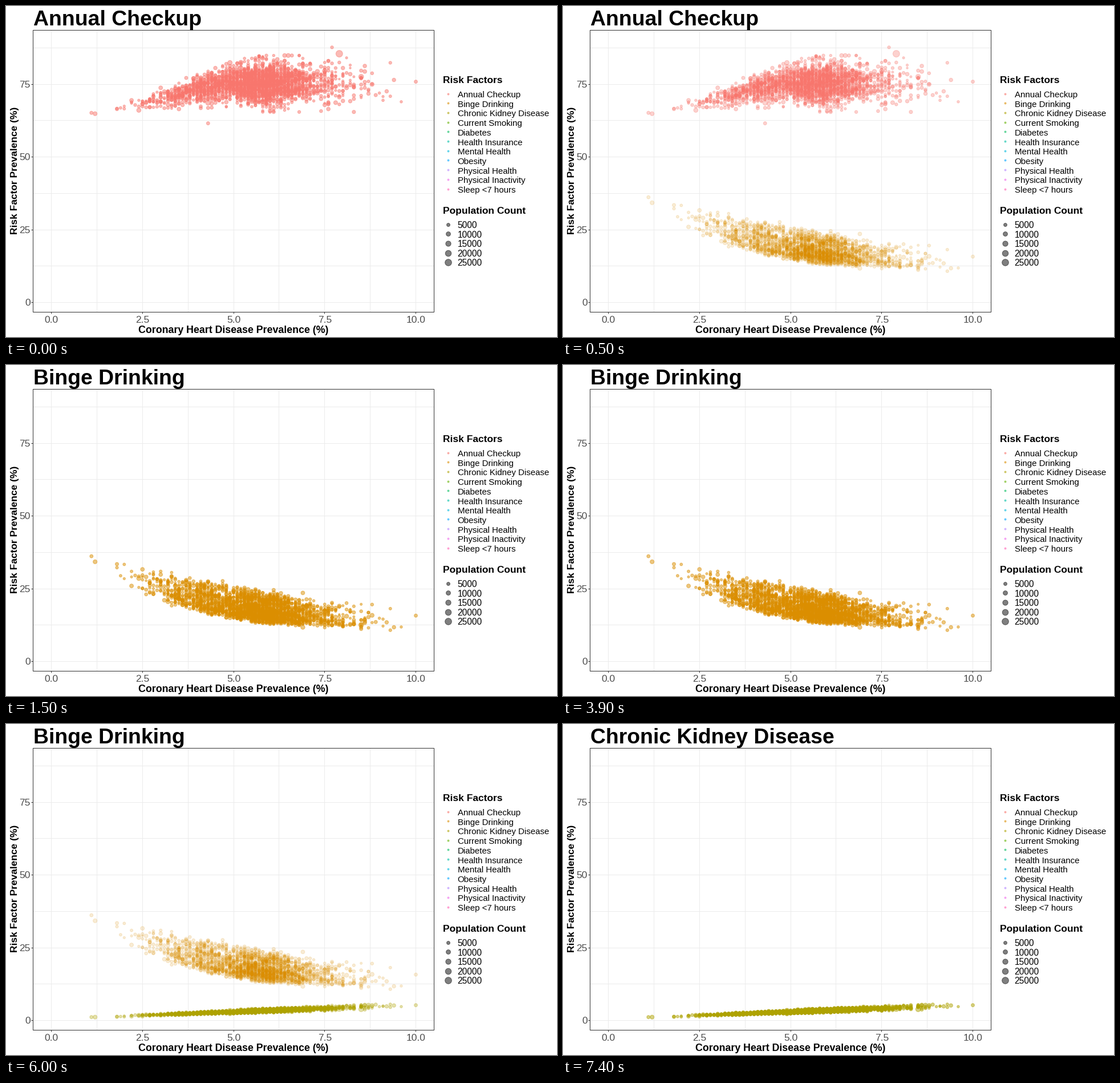
Recreate the animation shown at these times as a matplotlib script. Size 966 by 580 pixels, loop 8000 ms.

```python
import numpy as np
import matplotlib.pyplot as plt
from matplotlib.animation import FuncAnimation
from matplotlib.patches import Rectangle

W, H, DPI = 966, 580, 100
PT = 72 / DPI  # points per pixel
STEP, FRAMES = 500, 16
LEFT, RIGHT, TOP, BOTTOM = 47.5, 750.5, 41.7, 535.7

FACTORS = {
    "Annual Checkup": "#F8766D", "Binge Drinking": "#DB8E00",
    "Chronic Kidney Disease": "#AEA200", "Current Smoking": "#64B200",
    "Diabetes": "#00BD5C", "Health Insurance": "#00C1A7",
    "Mental Health": "#00BADE", "Obesity": "#00A6FF",
    "Physical Health": "#B385FF", "Physical Inactivity": "#EF67EB",
    "Sleep <7 hours": "#FF63B6"}
NAMES, COLORS = list(FACTORS), list(FACTORS.values())


def px_x(v):
    return 79.5 + 63.9 * v


def px_y(v):
    return 518.7 - 5.1 * v


def radius(pop):
    return .6 + 5.3 * np.sqrt(pop / 26)


def make_data():
    """Seeded tracts: disease %, population in thousands, factor series."""
    rng = np.random.default_rng(11)
    x = np.concatenate([rng.normal(5.65, .8, 1350), rng.normal(5.9, 1.55, 720),
                        rng.triangular(1.8, 4.2, 4.6, 230)])
    x = np.round(x[(x > 1.75) & (x < 9.8)], 1)
    n = len(x)
    pop = np.clip(rng.lognormal(np.log(3.8), .45, n), .3, 13)

    noise = np.clip(rng.normal(0, 1, n), -2.7, 2.7)
    checkup = 75 - 2.7 * np.maximum(4.9 - x, 0)
    checkup += np.clip(.75 * (x - 1), .6, 3.6) * noise

    # A dense band near the lower edge and a looser one below the upper edge
    low = 10 + 39 * np.exp(-.43 * x)
    high = 39.5 - 3.2 * x + .1 * x ** 2
    upper = rng.random(n) < np.clip(1.2 - .17 * x, .4, .8)
    share = np.where(upper, rng.beta(3, 2, n), rng.beta(2, 6, n))
    binge = low + (high - low) * share + rng.normal(0, .5, n)

    # The few tracts that stand apart: x, population, checkup, binge
    apart = np.array([(1.1, 5, 65, 36), (1.2, 8, 64.7, 34.1),
                      (4.3, 5, 61.4, 21), (7.7, 4, 87.5, 18.5),
                      (7.9, 26, 85.3, 13), (10, 5, 75.7, 15.6)]).T
    x, pop, checkup, binge = (np.append(a, b) for a, b in
                              zip((x, pop, checkup, binge), apart))
    noise = np.clip(rng.normal(0, 1, len(x)), -2.3, 2.3)
    kidney = np.minimum(.4 + .48 * x, 4.75) + np.minimum(.05 * x, .42) * noise
    return x, pop, [np.round(v, 1) for v in (checkup, binge, kidney)]


fig = plt.figure(figsize=(W / DPI, H / DPI), dpi=DPI, facecolor="white")
ax = fig.add_axes([0, 0, 1, 1])
ax.set_xlim(0, W)
ax.set_ylim(H, 0)
ax.axis("off")


def label(x, y, text, size, weight="normal", color="black", **kw):
    return ax.text(x, y, text, fontsize=size * PT, weight=weight, color=color,
                   family="Liberation Sans", **kw)


def line(xs, ys, color, z):
    # Half a pixel of shift makes snapping pick the pixel under the centre
    ax.plot(np.array(xs) - .5, np.array(ys) + .5, color=color, lw=PT,
            zorder=z, solid_capstyle="butt")


def dots(x, y, r, color, alpha=.5):
    return ax.scatter(x, y, s=(2 * r * PT) ** 2, facecolors=color,
                      edgecolors=color, linewidths=PT, alpha=alpha, zorder=3)


def draw_panel():
    for i in range(9):
        gx = px_x(1.25 * i)
        line([gx, gx], [TOP, BOTTOM], "#EBEBEB", 1)
        if i % 2 == 0:
            line([gx, gx], [BOTTOM, BOTTOM + 3], "#333333", 2)
            label(gx, 555, f"{1.25 * i:.1f}", 17.4, color="#4D4D4D",
                  ha="center")
    for i in range(8):
        gy = px_y(12.5 * i)
        line([LEFT, RIGHT], [gy, gy], "#EBEBEB", 1)
        if i % 2 == 0:
            line([LEFT - 3, LEFT], [gy, gy], "#333333", 2)
            label(42.5, gy + 6.3, f"{12.5 * i:.0f}", 17.4, color="#4D4D4D",
                  ha="right")
    ax.add_patch(Rectangle((LEFT - .5, TOP + .5), RIGHT - LEFT, BOTTOM - TOP,
                           fill=False, ec="#333333", lw=PT, zorder=4))
    label(399, 573, "Coronary Heart Disease Prevalence (%)", 17.8, "bold",
          ha="center")
    label(20, 288.5, "Risk Factor Prevalence (%)", 17.4, "bold", rotation=90,
          ha="center", va="baseline", rotation_mode="anchor")


def draw_legend():
    label(766, 135, "Risk Factors", 17.4, "bold")
    for i, (name, color) in enumerate(FACTORS.items()):
        dots(775, 153.5 + 16.7 * i, 1.5, color)
        label(791.5, 160 + 16.7 * i, name, 15)
    label(766, 364, "Population Count", 17.4, "bold")
    for i in range(5):
        pop = 5 * (i + 1)
        dots(775.2, 382.8 + 16.6 * i, radius(pop), "black")
        label(791.5, 389 + 16.6 * i, f"{pop * 1000}", 15.5)


draw_panel()
draw_legend()
title = label(47.5, 34.5, "", 37.4, "bold")
x, pop, series = make_data()
clouds = [dots(px_x(x), px_y(v), radius(pop), color, 0)
          for v, color in zip(series, COLORS)]


def update(frame):
    # Cross-fades take three steps and begin at steps 0 and 10
    stage = np.clip(frame / 3, 0, 1) + np.clip((frame - 10) / 3, 0, 1)
    title.set_text(NAMES[int(stage + 1e-9)])
    for i, cloud in enumerate(clouds):
        alpha = .5 * max(0, 1 - abs(stage - i))
        cloud.set_alpha(alpha)
        cloud.set_visible(alpha > .01)
    return [title, *clouds]


anim = FuncAnimation(fig, update, frames=FRAMES, interval=STEP, repeat=True,
                     repeat_delay=0, blit=False)
plt.show()
```
